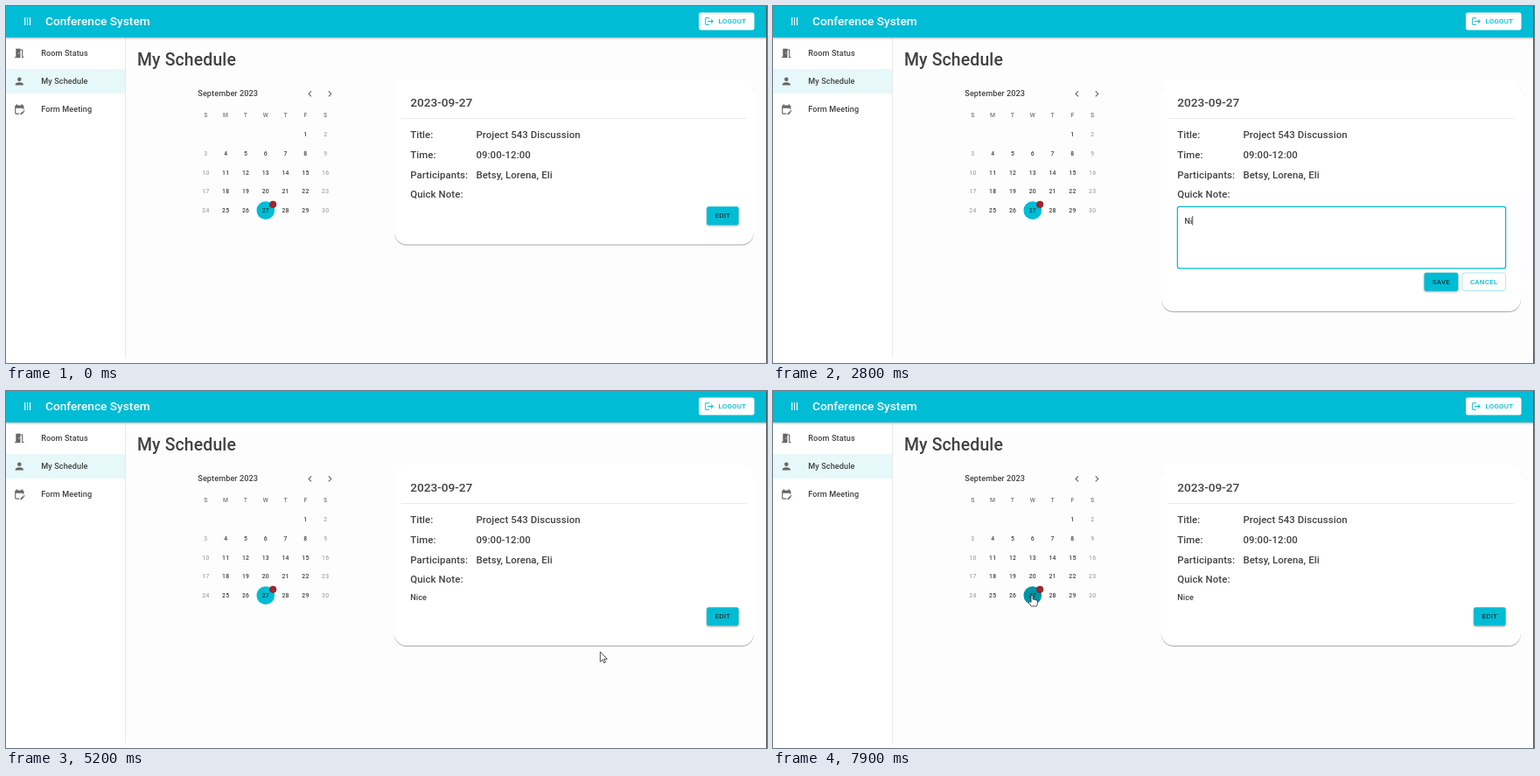
An HTML page that plays this animation: 870 px wide and 408 px high, repeating every 8.5 s.

```html
<!DOCTYPE html>
<html lang="en">
<head>
<meta charset="utf-8">
<title>My Schedule</title>
<style>
html, body { margin: 0; width: 100%; height: 100%; overflow: hidden; background: #fdfdfd; }
svg { display: block; width: 870px; height: 408px; }
text { font-family: Roboto, sans-serif; font-weight: 500; fill: #424242; }
.h4 { font-size: 19.4px; letter-spacing: .00735em; }
.h5 { font-size: 13.68px; }
.h6 { font-size: 11.4px; letter-spacing: .0075em; }
.body { font-size: 9.12px; letter-spacing: .00938em; }
.button { font-size: 7.98px; letter-spacing: .02857em; text-anchor: middle; }
.day { font-size: 6.84px; letter-spacing: .03333em; text-anchor: middle; }
.hint { font-weight: 400; fill: #a6a6a6; }
.white { fill: #fff; }
.cyan { fill: #00bcd4; }
.muted { fill: #a8a8a8; }
.head { fill: #777; }
.ink { fill: #17383d; }
.card { filter: drop-shadow(0 1px .7px rgba(0,0,0,.33)); }
.raised { filter: drop-shadow(0 1px 1px rgba(0,0,0,.35)); }
</style>
</head>
<body>
<svg id="stage" viewBox="0 0 870 408"></svg>
<script>
const LOOP = 8500;
const CYAN = [0, 188, 212], DARK = [0, 148, 164];
const OPEN = 1200, FOCUS = 1600, SAVE = 4900, PICK_29 = 6200, PICK_27 = 7400;
const KEYS = [[2500, 'N'], [2800, 'Ni'], [3000, 'Nic'], [3300, 'Nice']];
// time, x, y of the pointer tip
const PATH = [
  [400, 640, 300], [1000, 819, 239], [1200, 819, 239],
  [4300, 778, 294], [4600, 768.5, 316], [4950, 768.5, 316],
  [5800, 344, 230], [5900, 344, 230], [6200, 339, 233],
  [6700, 339, 233], [7000, 296, 233], [8500, 296, 233]
];
const ICONS = {
  room: 'M14 6v15H3v-2h2V3h9v1h5v15h2v2h-4V6h-3zm-4 5v2h2v-2h-2z',
  person: 'M12 12a4 4 0 1 0 0-8 4 4 0 0 0 0 8zm0 2c-2.67 0-8 1.34-8 4v2h16v-2c0-2.66-5.33-4-8-4z',
  form: 'M12 22H5a2 2 0 0 1-2-2V6a2 2 0 0 1 2-2h1V2h2v2h8V2h2v2h1a2 2 0 0 1 2 2v6h-2v-2H5v10h7zM22.1 17l.7-.7a1 1 0 0 0 0-1.4l-.7-.7a1 1 0 0 0-1.4 0l-.7.7zM21.4 17.7 16.1 23H14v-2.1l5.3-5.3z',
  logout: 'M17 7l-1.4 1.4 2.6 2.6H8v2h10.2l-2.6 2.6L17 17l5-5zM4 5h8V3H4a2 2 0 0 0-2 2v14a2 2 0 0 0 2 2h8v-2H4z',
  left: 'M15.4 16.6 10.8 12l4.6-4.6L14 6l-6 6 6 6z',
  right: 'M8.6 16.6 13.2 12 8.6 7.4 10 6l6 6-6 6z'
};
const HAND = 'M-1 1Q0-.7 1.1 1V5.2Q2.3 4.5 3 5.5 4.2 5 4.8 6 6.3 5.7 6.4 7.2V9.5Q6.2 11.4 5.2 13H-.9Q-2.3 10.7-4 8.2-3.6 6.5-1 8.4Z';
const ARROW = 'M0 0V11.5L2.7 9 4.4 12.8 6.1 12 4.4 8.4H8Z';

const clamp = v => Math.max(0, Math.min(1, v));
const fade = (t, from, to, length = 200) => clamp((t - from) / length) * clamp(1 - (t - to) / length);
const mix = k => `rgb(${CYAN.map((c, i) => Math.round(c + (DARK[i] - c) * k))})`;

const text = (x, y, cls, str) => `<text x="${x}" y="${y}" class="${cls}">${str}</text>`;
const rect = (x, y, w, h, fill, extra = '') =>
  `<rect x="${x}" y="${y}" width="${w}" height="${h}" fill="${fill}" ${extra}/>`;
const icon = (name, cx, cy, size = 13.7, fill = '#666') =>
  `<path d="${ICONS[name]}" fill="${fill}" transform="translate(${cx - size / 2} ${cy - size / 2}) scale(${size / 24})"/>`;
const button = (x, y, w, label, fill) =>
  rect(x, y, w, 21, fill, 'rx="2.3" class="raised"') + text(x + w / 2, y + 13.1, 'button ink', label);

function frame() {
  const nav = ['room', 'person', 'form'].map((name, i) =>
    icon(name, 15.3, 54 + 32 * i) +
    text(40.3, 57.2 + 32 * i, 'body', ['Room Status', 'My Schedule', 'Form Meeting'][i])).join('');
  return rect(0, 36, 136, 372, '#fff') + rect(136, 36, .7, 366, '#e0e0e0') +
    rect(0, 72, 136, 28, '#e6f8fa') + nav +
    rect(0, 0, 870, 35.8, '#00bcd4', 'class="raised"') +
    [21.2, 24.1, 27].map(x => rect(x, 13, 1.1, 9, '#fff')).join('') +
    text(45, 22.3, 'h5 white', 'Conference System') +
    rect(792, 7.5, 63.5, 20, '#fff', 'rx="2.3"') + icon('logout', 804, 17.5, 11.4, '#00bcd4') +
    text(830.4, 20.3, 'button cyan', 'LOGOUT') +
    text(150, 67.8, 'h4', 'My Schedule') +
    text(219.3, 103.4, 'body', 'September 2023') +
    icon('left', 347.5, 100.4) + icon('right', 370.3, 100.4) +
    rect(869, 0, 1, 408, '#555');
}

function calendar(t, selected) {
  const colX = c => 228.4 + 22.8 * c;
  let out = [...'SMTWTFS'].map((d, c) => text(colX(c), 126.7, 'day head', d)).join('');
  for (let d = 1; d <= 30; d++) {
    const col = (d + 4) % 7, row = Math.floor((d + 4) / 7);
    const x = colX(col), y = 147 + 21.66 * row;
    const hover = d === 29 ? fade(t, 5700, 6850) : d === 27 ? fade(t, 6900, 9000) : 0;
    const circle = (r, fill, extra = '') => `<circle cx="${x}" cy="${y}" r="${r}" fill="${fill}" ${extra}/>`;
    if (d === selected) out += circle(10.3, mix(hover));
    else {
      if (hover) out += circle(10.3, `rgba(0,188,212,${.08 * hover})`);
      if (d === 27) out += circle(10.1, 'none', 'stroke="#777" stroke-width=".7"');
    }
    const cls = d === selected ? 'ink' : col % 6 ? '' : 'muted';
    out += text(x, y + 2.4, 'day ' + cls, d);
  }
  return out + '<circle cx="305.2" cy="226.8" r="3.8" fill="#a8242c" stroke="#5c2024" stroke-width=".6"/>';
}

function editor(t, note) {
  const focused = t >= FOCUS;
  const border = focused ? 'stroke="#00bcd4" stroke-width="1.3"' : 'stroke="#4a4a4a" stroke-width=".7"';
  const since = t - Math.max(FOCUS, ...KEYS.filter(k => k[0] <= t).map(k => k[0]));
  const caret = focused && since % 1000 < 500;
  return rect(462.4, 229.4, 375.2, 70.4, '#fff', `rx="2.3" ${border}`) +
    (note ? `<text x="470.4" y="248.5" class="body" id="note">${note}</text>` : text(470.4, 248.5, 'body hint', 'Type your note here')) +
    (caret ? rect(470.4, 240, .8, 10.5, '#333', 'id="caret"') : '') +
    button(744.5, 304.7, 38.8, 'SAVE', mix(fade(t, 4400, 9000))) +
    rect(787.8, 305, 49.8, 20.5, 'none', 'rx="2.3" stroke="#80deea" stroke-width=".7"') +
    text(812.7, 317.8, 'button cyan', 'CANCEL');
}

function card(t, selected) {
  const editing = t >= OPEN && t < SAVE, saved = t >= SAVE;
  const bottom = selected === 29 ? 174.3 : editing ? 349 : saved ? 291 : 272.5;
  let out = rect(444, 84, 411, bottom - 84, '#fff', 'rx="14" class="card"') +
    text(462.2, 114.9, 'h5', '2023-09-' + selected) + rect(452, 128, 395, .7, '#e3e3e3');
  if (selected === 29) return out + text(462.2, 147.8, 'body', 'No meeting today');
  const rows = [['Title:', 'Project 543 Discussion'], ['Time:', '09:00-12:00'],
    ['Participants:', 'Betsy, Lorena, Eli'], ['Quick Note:', '']];
  rows.forEach(([label, value], i) => {
    const y = 151 + 22.8 * i;
    out += text(462.2, y, 'h6', label) + text(537.4, y, 'h6', value);
  });
  const note = (KEYS.filter(k => k[0] <= t).pop() || [0, ''])[1];
  if (editing) return out + editor(t, note);
  if (saved) out += text(462.2, 238.9, 'body', note);
  return out + button(801, saved ? 247.3 : 229.3, 36.6, 'EDIT', mix(saved ? 0 : fade(t, 850, 9000)));
}

function pointer(t) {
  if (t < 400 || t >= OPEN && t < 4300) return '';
  const i = Math.max(1, PATH.findIndex(p => p[0] > t));
  const [t0, x0, y0] = PATH[i - 1], [t1, x1, y1] = PATH[i];
  const k = clamp((t - t0) / (t1 - t0)), e = k * k * (3 - 2 * k);
  const x = x0 + (x1 - x0) * e, y = y0 + (y1 - y0) * e;
  const overDay = x < 355 && y > 222;
  const overButton = t < OPEN ? x > 801 && y < 251 : t < SAVE && y > 304;
  return `<path d="${overDay || overButton ? HAND : ARROW}" transform="translate(${x} ${y})" fill="#fff" stroke="#222" stroke-width=".8" stroke-linejoin="round"/>`;
}

const stage = document.getElementById('stage');
const staticPart = frame();

function draw(now) {
  const t = now % LOOP;
  const selected = t >= PICK_29 && t < PICK_27 ? 29 : 27;
  stage.innerHTML = staticPart + calendar(t, selected) + card(t, selected) + pointer(t);
  const caret = document.getElementById('caret'), note = document.getElementById('note');
  if (caret && note) caret.setAttribute('x', 470.4 + note.getComputedTextLength());
  requestAnimationFrame(() => draw(performance.now()));
}
draw(0);
</script>
</body>
</html>
```
